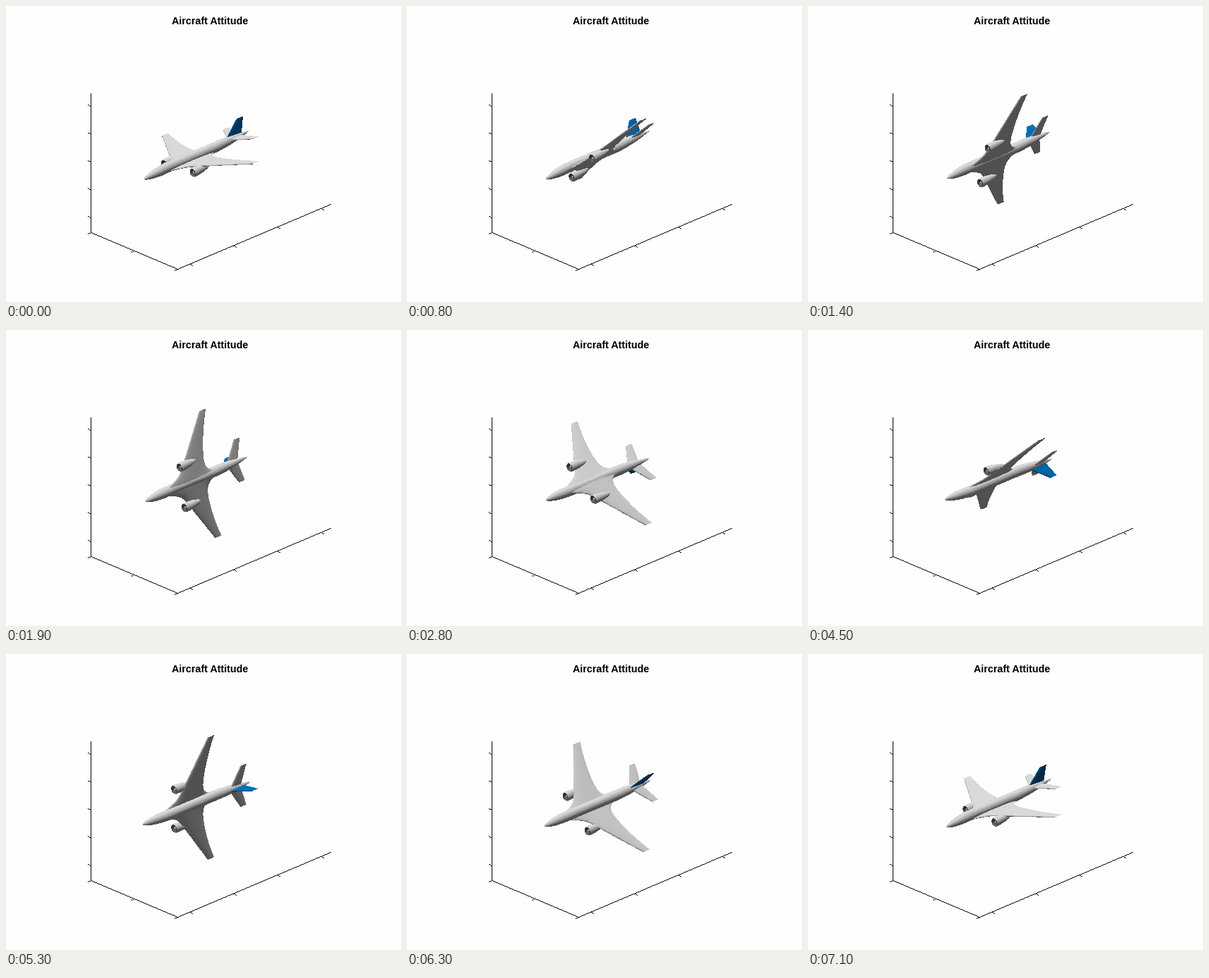
A matplotlib script that plays this animation: 560 px wide and 420 px high, repeating every 7300 ms.

```python
import numpy as np
import matplotlib.pyplot as plt
from matplotlib.animation import FuncAnimation

W, H, DPI = 560, 420, 100
FRAMES, INTERVAL = 73, 100
STEP = np.radians(5)

GREY, BLUE, DUCT = (218, 218, 218), (0, 114, 189), (130, 130, 130)

# Model coordinates: aft from the nose, right, up; the roll axis is r = u = 0.
ORIGIN = np.array([195.5, 242.4])
PROJECT = np.array([[0.7071, -0.2988], [-0.7071, -0.2988], [0, -0.95]])
TO_CAMERA = np.array([-0.641, -0.641, 0.4226])


def vectors(a, r, u):
    return np.stack(np.broadcast_arrays(a, r, u), axis=-1).astype(float)


def loft(centres, major, minor, colour, sides, facing=1):
    """Dense points on a chain of elliptic rings: (points, normals, colours)."""
    t = np.linspace(0, 2 * np.pi, sides)[None, :, None]
    spokes = major[:, None] * np.cos(t) + minor[:, None] * np.sin(t)
    points = centres[:, None] + spokes
    normals = np.cross(np.gradient(points, axis=0), np.gradient(points, axis=1))
    normals /= np.linalg.norm(normals, axis=2, keepdims=True) + 1e-9
    inward = np.sum(normals * spokes, axis=2, keepdims=True) < 0
    normals *= np.where(inward, -facing, facing)
    points = points.reshape(-1, 3)
    return points, normals.reshape(-1, 3), np.tile(colour, (len(points), 1))


def body(a, radius, up, right=0, colour=GREY, facing=1):
    return loft(vectors(a, right, up), vectors(0, radius, 0),
                vectors(0, 0, radius), colour, 100, facing)


def panel(span, lead, trail, height, thick, side):
    return loft(vectors((lead + trail) / 2, side * span, height),
                vectors((trail - lead) / 2, 0, 0), vectors(0, 0, thick), GREY, 400)


def fuselage():
    a = np.linspace(0, 209, 500)
    nose = np.clip(1 - a / 45, 0, 1)
    tail = np.clip((a - 140) / 69, 0, 1)
    radius = 6.6 * (1 - nose ** 2) ** 0.7 * (1 - tail ** 2)
    return body(a, radius, 3 * tail - 2.7 * nose)


def wing(side):
    span = np.linspace(0, 90.5, 200)
    lead = 60 + 0.74 * span - 25 * np.exp(-(span / 10) ** 2)
    trail = 118 + 0.0025 * span ** 2 + 37 * np.exp(-span / 6)
    return panel(span, lead, trail, 0.05 * span - 4, 2 - 0.016 * span, side)


def tailplane(side):
    span = np.linspace(0, 30, 70)
    return panel(span, 168 + 0.7 * span, 189 + 0.35 * span,
                 3 + 0.04 * span, 0.9 - 0.015 * span, side)


def fin():
    t = np.linspace(0, 1, 80)
    lead, trail = 162 + 26 * t, 194 + 5.5 * t
    return loft(vectors((lead + trail) / 2, 0, 2 + 25 * t),
                vectors((trail - lead) / 2, 0, 0), vectors(0, 0.5 + 0 * t, 0), BLUE, 120)


def engine(side):
    t = np.linspace(0, 1, 90)
    right = 29 * side
    return [body(68 + 34 * t, 6 * (1 - t ** 2) ** 0.7, 2 * t - 8, right),
            body(68 + 4 * t, 5.2 * (1 - t), -8, right, DUCT, facing=-1),
            body(68.5 + 3 * t, 2.4 * t, -8, right)]


parts = [fuselage(), fin()]
for side in (-1, 1):
    parts += [wing(side), tailplane(side), *engine(side)]
POINTS, NORMALS, COLOURS = (np.concatenate(p) for p in zip(*parts))


def roll(points, angle):
    c, s = np.cos(angle), np.sin(angle)
    a, r, u = points.T
    return np.column_stack([a, r * c + u * s, u * c - r * s])


def line(canvas, x0, y0, x1, y1):
    n = int(max(abs(x1 - x0), abs(y1 - y0))) + 1
    x, y = np.linspace(x0, x1, n), np.linspace(y0, y1, n)
    canvas[np.rint(y).astype(int), np.rint(x).astype(int)] = 0


def axis_box():
    canvas = np.full((H, W, 3), 254, np.uint8)
    line(canvas, 120, 124, 120, 321)
    line(canvas, 120, 321, 243, 373)
    line(canvas, 243, 373, 460, 281)
    for k in range(5):
        y = 142 + 39.5 * k
        line(canvas, 120, y, 116, y - 2)
    for k in range(3):
        x, y = 120 + 61.5 * k, 321 + 26 * k
        line(canvas, x, y, x - 4, y + 2)
    for k in range(4):
        x, y = 260 + 62 * k, 365.8 - 26.3 * k
        line(canvas, x, y, x + 4, y + 2)
    return canvas


fig = plt.figure(figsize=(W / DPI, H / DPI), dpi=DPI, facecolor="#fefefe")
ax = fig.add_axes([0, 0, 1, 1])
ax.axis("off")
BOX = axis_box()
picture = ax.imshow(BOX, extent=(0, W, H, 0), interpolation="nearest", aspect="auto")
ax.text(289.6, 25.7, "Aircraft Attitude", ha="center", va="baseline", color="black",
        family="Liberation Sans", weight="bold", size=14.2 * 72 / DPI)


def draw(i):
    # The level pose is held for the last two steps.
    angle = STEP * min(i + 1, FRAMES - 1)
    normals = roll(NORMALS, angle)
    seen = normals @ TO_CAMERA > 0
    points = roll(POINTS[seen], angle)
    light = 0.37 + 0.63 * np.clip(normals[seen, 2], 0, 1) ** 0.8
    x, y = np.rint(points @ PROJECT + ORIGIN).astype(int).T

    # Paint from far to near, so the nearest point keeps the pixel.
    order = np.argsort(points @ TO_CAMERA)
    canvas = BOX.copy()
    canvas[y[order], x[order]] = (COLOURS[seen] * light[:, None])[order]
    picture.set_data(canvas)
    return [picture]


anim = FuncAnimation(fig, draw, frames=FRAMES, interval=INTERVAL,
                     repeat=True, repeat_delay=0, blit=False)
plt.show()
```
